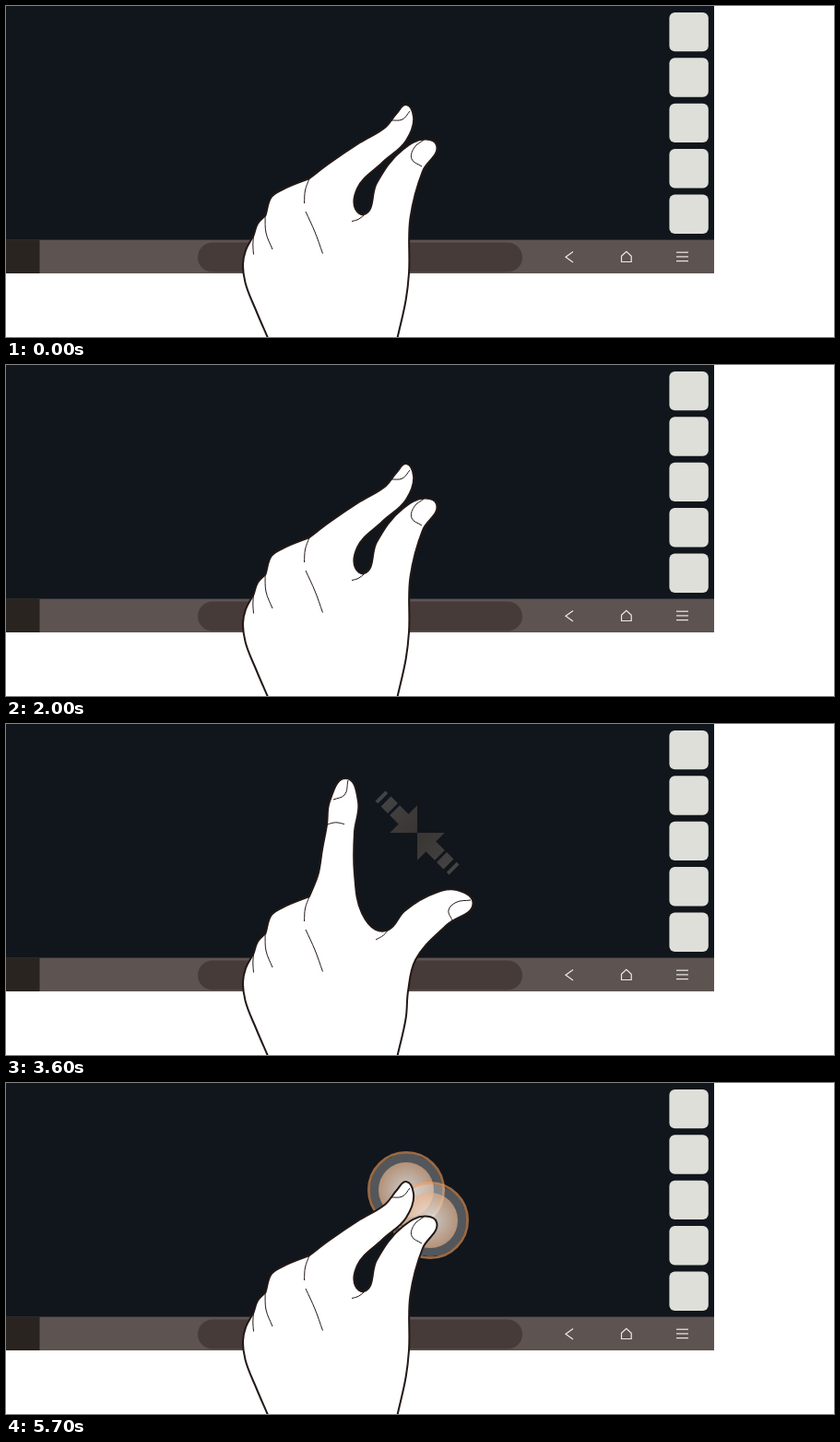
An HTML page with a canvas for the animation above (6700 ms loop, 898 by 359 pixels).

```html
<!DOCTYPE html>
<html lang="en">
<head>
<meta charset="utf-8">
<title>Pinch and spread gesture</title>
<style>
html, body { margin: 0; width: 100%; height: 100%; overflow: hidden; background: #fff; }
canvas { display: block; }
</style>
</head>
<body>
<canvas id="stage" width="898" height="359"></canvas>
<script>
const ctx = document.getElementById('stage').getContext('2d');
const LOOP = 6700, STEP = 100, TAU = Math.PI * 2;

// Key points of each pose: index finger and thumb outline, touch centres,
// and the fine lines (finger nail, thumb nail, web, joint).
const CLOSED = {
  edge: [329,187, 350,171, 384,148, 412,131, 424,116, 434,107, 442,120, 434,146, 408,170,
    381,198, 379,220, 388,226, 402,192, 430,156, 455,144.5, 467,151, 452,179, 438.5,230, 437,290],
  touch: [434,116, 460,149],
  nail: [417,124, 430,123, 438,114],
  thumb: [454,144.5, 442.5,154, 440,166, 451,174],
  web: [375,233.5, 382,231.5, 388,227],
  joint: [412,131, 412,131, 412,131]
};
const HALF = {
  edge: [329,187, 343,160, 356,132, 369,108, 381,83, 394,66.5, 409,88, 400,117, 383,158,
    383,195, 394,218, 408,215, 424,197, 456,171, 483,164, 499.5,181, 475,203, 445,252, 436.5,290],
  touch: [397,75, 489,177.5],
  nail: [381,89, 394.5,85, 402,71],
  thumb: [491,167.5, 474,174, 467,186, 477,197],
  web: [387,221, 396,221, 405,217],
  joint: [367,109.5, 373,109, 379,112]
};
const OPEN = {
  edge: [329,187, 338.5,163, 343,136, 348,109, 351,84, 369,59, 382,84, 378,117, 378,163,
    386,205, 401,223, 415,223, 432,203, 466,183, 489,180, 506.5,194, 478,218, 444,256, 436,290],
  touch: [369,67, 497,191],
  nail: [355,82, 367,77, 371,61],
  thumb: [504,191, 488,193.5, 480,202, 484,213],
  web: [401,234, 409.5,229, 416,221.5],
  joint: [348,109, 357.5,106.8, 367,108.5]
};
const WRIST = [284,360, 271.5,331, 259.5,300, 257,280, 260,265, 268.5,249];
const KNUCKLES = [[268.5,249, 273,236, 281.5,227], [281.5,227, 288,207, 299,199.5, 329,187]];
const CREASES = [
  [329,187, 324.5,200, 323.5,214],
  [325,223, 335,245, 343.5,268.5],
  [281,227, 282,246, 289,264],
  [268.5,249, 267.8,259, 268.5,269.5]
];

const clamp = (x, a, b) => Math.min(b, Math.max(a, x));
const blend = (a, b, k) => a.map((v, i) => v + (b[i] - v) * k);

// Adds a smooth curve through a flat list of points to the current path.
function spline(list) {
  const n = list.length / 2;
  const unit = i => {
    if (i < 0 || i > n - 2) return [0, 0, 0];
    const dx = list[2 * i + 2] - list[2 * i], dy = list[2 * i + 3] - list[2 * i + 1];
    const len = Math.hypot(dx, dy);
    return [dx / (len || 1), dy / (len || 1), len];
  };
  const tangent = i => {
    const a = unit(i - 1), b = unit(i);
    const x = a[0] + b[0], y = a[1] + b[1], len = Math.hypot(x, y) || 1;
    return [x / len, y / len];
  };
  ctx.lineTo(list[0], list[1]);
  for (let i = 0; i < n - 1; i++) {
    const h = unit(i)[2] * 0.36, s = tangent(i), e = tangent(i + 1);
    const [x, y, u, v] = list.slice(2 * i, 2 * i + 4);
    ctx.bezierCurveTo(x + s[0] * h, y + s[1] * h, u - e[0] * h, v - e[1] * h, u, v);
  }
}

function thin(list) {
  ctx.beginPath();
  spline(list);
  ctx.stroke();
}

function poly(points, close) {
  ctx.beginPath();
  points.forEach(([x, y]) => ctx.lineTo(x, y));
  if (close) ctx.closePath();
}

function roundBox(x, y, w, h, r, fill) {
  ctx.beginPath();
  ctx.roundRect(x, y, w, h, r);
  ctx.fillStyle = fill;
  ctx.fill();
}

function rect(x, y, w, h, fill) {
  ctx.fillStyle = fill;
  ctx.fillRect(x, y, w, h);
}

function screen() {
  rect(0, 0, 898, 359, '#fff');
  rect(0, 0, 768, 254, '#11161c');
  rect(0, 253.6, 768, 36.4, '#5d5350');
  rect(0, 253.6, 36.5, 36.4, '#2a2421');
  roundBox(208, 256.5, 352, 32, 16, '#473b3a');
  for (let i = 0; i < 5; i++) roundBox(719.4, 6.9 + i * 49.4, 42.4, 42.4, 6, '#dedfd9');

  ctx.strokeStyle = '#eceae8';
  ctx.lineWidth = 1.2;
  poly([[615, 266.5], [607, 272.2], [615, 278]]);
  ctx.stroke();
  poly([[667.5, 271.2], [672.8, 266.3], [678.2, 271.2], [678.2, 277.5], [667.5, 277.5]], true);
  ctx.stroke();
  for (const y of [267.2, 271.9, 276.6]) {
    poly([[727, y], [740, y]]);
    ctx.stroke();
  }
}

// Diagonal arrow with its tip at x, y; dir 1 points down right, -1 up left.
function arrow(x, y, dir, len) {
  ctx.save();
  ctx.translate(x, y);
  ctx.rotate(Math.PI / 4);
  ctx.scale(dir, 1);
  const g = ctx.createLinearGradient(0, 0, -len, 0);
  g.addColorStop(0, '#b49073');
  g.addColorStop(1, '#dccfc4');
  ctx.fillStyle = g;
  poly([[0, 0], [-21, 21], [-21, -21]]);
  ctx.fill();
  const bar = (from, to) => ctx.fillRect(-to, -7.7, to - from, 15.4);
  bar(21, 34.5);
  bar(37.5, 48);
  bar(len - 3.8, len);
  ctx.restore();
}

function arrows(alpha, p, q, dir, len) {
  ctx.globalAlpha = alpha;
  arrow(...p, -dir, len);
  arrow(...q, dir, len);
  ctx.globalAlpha = 1;
}

function touchMark(x, y, alpha) {
  const disc = r => { ctx.beginPath(); ctx.arc(x, y, r, 0, TAU); };
  ctx.globalAlpha = alpha;
  disc(39.3);
  ctx.fillStyle = 'rgba(255,255,255,0.28)';
  ctx.fill();
  disc(40.6);
  ctx.strokeStyle = 'rgba(255,165,95,0.58)';
  ctx.lineWidth = 2.8;
  ctx.stroke();
  const g = ctx.createRadialGradient(x, y, 0, x, y, 30);
  g.addColorStop(0, 'rgba(255,252,250,0.7)');
  g.addColorStop(1, 'rgba(231,178,138,0.65)');
  disc(30);
  ctx.fillStyle = g;
  ctx.fill();
  ctx.globalAlpha = 1;
}

function hand(pose) {
  ctx.beginPath();
  [WRIST, ...KNUCKLES, [...pose.edge, 433.8,318, 424.5,360]].forEach(spline);
  ctx.fillStyle = '#fff';
  ctx.fill();
  ctx.strokeStyle = '#231815';
  ctx.lineWidth = 2;
  ctx.lineJoin = 'round';
  ctx.stroke();
  ctx.lineJoin = 'miter';
  ctx.lineWidth = 1;
  [...CREASES, pose.nail, pose.thumb, pose.web, pose.joint].forEach(thin);
}

function poseAt(t) {
  const k = clamp(t < 5400 ? (t - 2300) / STEP : 3 - (t - 5400) / STEP, 0, 3);
  const [a, b, f] = k <= 2 ? [CLOSED, HALF, k / 2] : [HALF, OPEN, k - 2];
  const pose = {};
  for (const key in a) pose[key] = blend(a[key], b[key], f);
  return pose;
}

// Fade in, one dip, fade out, in quarters.
function pulse(ms) {
  const k = ms / STEP;
  return clamp(Math.min(k + 1, 1 + Math.abs(k - 7), 15 - k) / 4, 0, 1);
}

function touchAlpha(t) {
  if (t >= 5400) return 1;
  if (t < 2300) return 0;
  return t < 2900 ? 1 : Math.max(0, 0.6 - 0.3 * (t - 2900) / STEP);
}

function draw(ms) {
  const t = Math.floor((ms % LOOP) / STEP) * STEP;
  const pose = poseAt(t);
  const [x1, y1, x2, y2] = pose.touch;
  const touch = touchAlpha(t);
  screen();
  arrows(pulse(t - 500), [420, 84], [496, 160], 1, 53);
  arrows(pulse(t - 3600), [446, 118], [446, 118], 1, 56.5);
  touchMark(x1, y1, touch);
  touchMark(x2, y2, touch);
  hand(pose);
}

let start;
function tick(now) {
  if (start === undefined) start = now;
  draw(now - start);
  requestAnimationFrame(tick);
}
draw(0);
requestAnimationFrame(tick);
</script>
</body>
</html>
```
